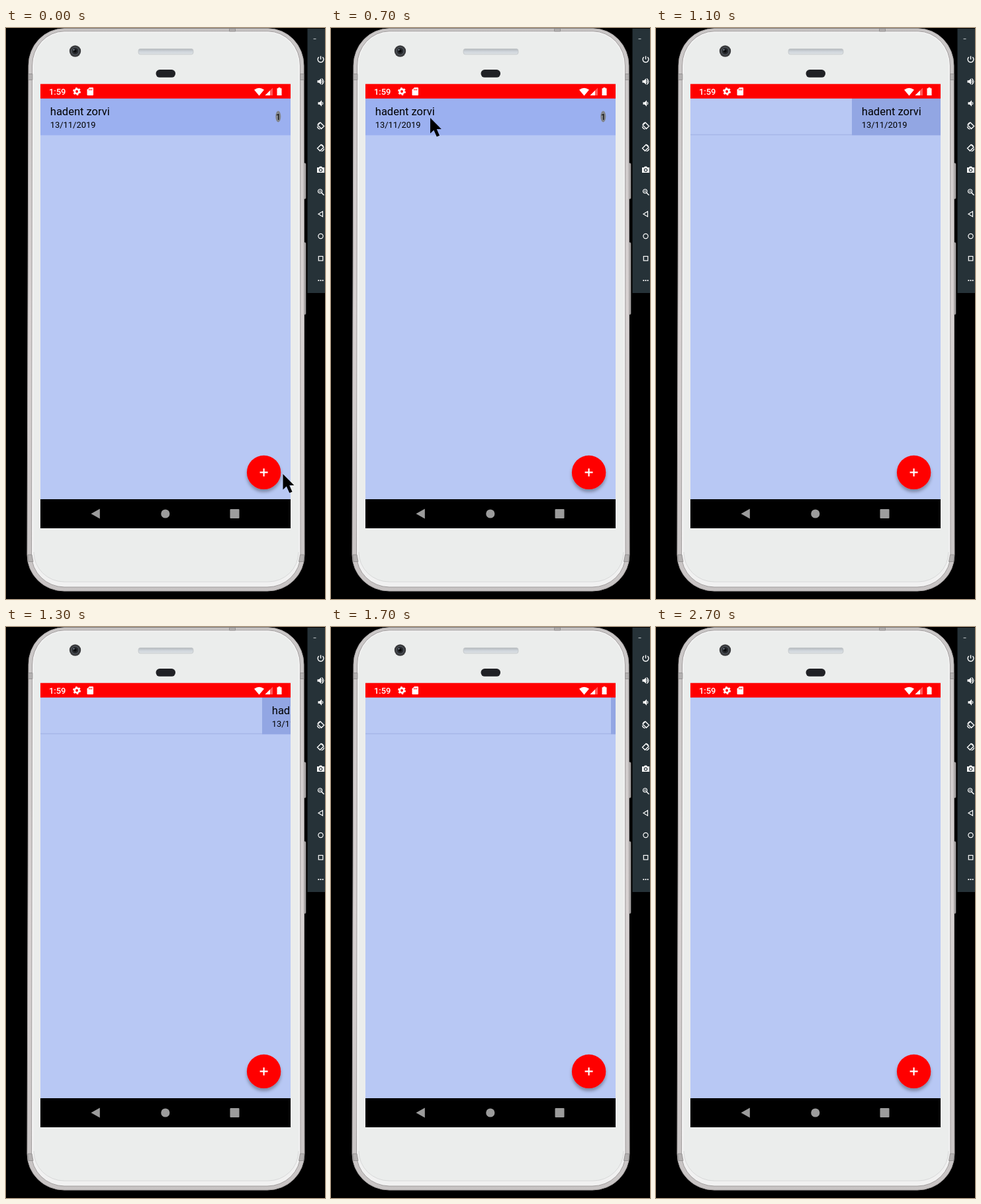
Write an HTML page that moves like this. It is 482 by 864 pixels and loops after 2.9 s.

```html
<!DOCTYPE html>
<html lang="en">
<head>
<meta charset="utf-8">
<style>
html, body { margin: 0; width: 100%; height: 100%; overflow: hidden; background: #000; }
svg { display: block; }
text { font-family: Roboto, sans-serif; }
.tools { fill: none; stroke: #fff; stroke-width: 1.2; }
.tools .solid { fill: #fff; stroke: none; }
</style>
</head>
<body>
<svg width="482" height="864" viewBox="0 0 482 864">
  <defs>
    <linearGradient id="metal" x2="0" y2="1">
      <stop offset="0" stop-color="#cac7c7"/><stop offset=".5" stop-color="#d8d2d2"/><stop offset="1" stop-color="#c8c4c4"/>
    </linearGradient>
    <linearGradient id="grille" x2="0" y2="1">
      <stop offset="0" stop-color="#b3b7bb"/><stop offset=".5" stop-color="#d0d6dc"/><stop offset="1" stop-color="#dde1e4"/>
    </linearGradient>
    <filter id="shade" x="-30%" y="-30%" width="160%" height="170%">
      <feDropShadow dx="0" dy="4" stdDeviation="2.8" flood-opacity=".33"/>
    </filter>
    <clipPath id="screen"><rect x="52" y="106" width="378" height="607"/></clipPath>
  </defs>

  <!-- phone body, slightly wider towards the bottom -->
  <g fill="#b0acac" stroke="#817d7d" stroke-width=".7">
    <rect x="447" y="204.500" width="6" height="54" rx="1.500"/>
    <rect x="447" y="324.500" width="6" height="109" rx="1.500"/>
  </g>
  <path d="M34 57A54 56 0 0 1 88 .8H396A54 56 0 0 1 450 57L451 797A56 55 0 0 1 395 852H88A56 55 0 0 1 32 797Z" fill="url(#metal)" stroke="#a5a1a1"/>
  <path d="M39.500 57A49 52 0 0 1 88 4.800H396A49 52 0 0 1 444.500 57L445 797A50 49 0 0 1 395 846H88A50 49 0 0 1 38.500 797Z" fill="#f1f1f1" stroke="#a19d9d"/>
  <path d="M42 57A46 49 0 0 1 88 7.500H396A46 49 0 0 1 442 57V793A46 45 0 0 1 396 838H88A46 45 0 0 1 42 793Z" fill="#ebedec"/>
  <path d="M42 793A46 45 0 0 0 88 838H396A46 45 0 0 0 442 793" fill="none" stroke="#d8d9d9"/>
  <path d="M34 69.500h6v9h-6zM444.500 69.500h5.500v9h-5.500zM337.500 1h9v4h-9zM33 797h6l2 10.500h-7zM444.500 797h6l-1 10.500h-7z" fill="#b4b1b1" stroke="#8c8989" stroke-width=".8"/>

  <!-- camera, speaker, sensor -->
  <circle cx="104.500" cy="35" r="8.700" fill="#3a3b3d"/>
  <circle cx="104.500" cy="35" r="5.500" fill="#25272a" stroke="#59606a"/>
  <circle cx="104.500" cy="35" r="2.300" fill="#090a0c"/>
  <circle cx="102.500" cy="33" r="1" fill="#8995a3"/>
  <rect x="200" y="31.500" width="83" height="8.500" rx="3" fill="url(#grille)" stroke="#c3c7ca" stroke-width=".8"/>
  <rect x="226.500" y="63" width="29.500" height="11.800" rx="5.700" fill="#202125"/>

  <!-- screen -->
  <rect x="52" y="106" width="378" height="607" fill="#b8c8f4"/>
  <g clip-path="url(#screen)">
    <path id="line" d="M52 161.500H430" stroke="#a6b6e8" stroke-width="1.500"/>
    <g id="row">
      <rect id="card" x="52" y="106" width="378" height="56.300"/>
      <text x="66.800" y="132" font-size="16.500">hadent zorvi</text>
      <text x="66.800" y="150.500" font-size="12.900">13/11/2019</text>
      <ellipse cx="411.300" cy="134" rx="4" ry="8.500" fill="#82858c"/>
      <text x="411.300" y="138.700" font-size="13" text-anchor="middle">1</text>
    </g>
  </g>

  <!-- status bar -->
  <rect x="52" y="84.700" width="378" height="22" fill="#f00"/>
  <g fill="#fff">
    <text x="65" y="101" font-size="12.900" font-weight="500">1:59</text>
    <circle cx="107" cy="96" r="3.300" fill="none" stroke="#fff" stroke-width="2.700"/>
    <circle cx="107" cy="96" r="5.100" fill="none" stroke="#fff" stroke-width="1.800" stroke-dasharray="2.670"/>
    <path d="M126 90h5q1 0 1 1v10q0 1-1 1h-7.500q-1 0-1-1v-7.500z"/>
    <path d="M125.700 92v2.500m2 -2.500v2.500m2 -2.500v2.500" stroke="#f00" stroke-width=".9"/>
    <path d="M375 93.500q7.500-5.500 15 0l-7.500 9z"/>
    <path d="M403 90.500v11.500h-11.500z" fill-opacity=".35"/>
    <path d="M399 94.500v7.500h-7.500z"/>
    <path d="M411.500 90h3v1.300h2v10.700h-7v-10.700h2z"/>
  </g>

  <circle cx="389.600" cy="672.400" r="25.700" fill="#f00" filter="url(#shade)"/>
  <path d="M383.600 672.400h12m-6-6v12" stroke="#fff" stroke-width="2.200"/>

  <!-- navigation bar -->
  <rect x="52" y="713" width="378" height="44"/>
  <g fill="#9c9c9c">
    <path d="M128.500 735l13.300-7.500v15z"/>
    <circle cx="240.800" cy="735" r="6.600"/>
    <rect x="338.500" y="728" width="14" height="14" rx="1"/>
  </g>

  <!-- emulator toolbar -->
  <rect x="455.500" y="1" width="26.500" height="400" fill="#263238"/>
  <g class="tools">
    <path d="M464.500 16.500h4" stroke="#aeb5b8"/>
    <g transform="translate(475.500 47.500)"><path d="M0-5V0M-2.800-3.500a4.400 4.400 0 1 0 5.600 0" stroke-width="1.400"/></g>
    <g transform="translate(475.500 81)"><path class="solid" d="M-5-1.800h2.500L.5-4.800v9.600L-2.500 1.800H-5z"/><path d="M1.500-2q2 2 0 4M1.500-4.500q6 4.500 0 9"/></g>
    <g transform="translate(475.500 114)"><path class="solid" d="M-4-1.800h2.500L1.500-4.800v9.600L-1.500 1.800H-4z"/><path d="M2.300-2q2 2 0 4"/></g>
    <g id="turn" transform="translate(475.500 147.500)"><path d="M-.5-4.500L5 1L1 5L-4.500-.5zM-5 1.500q.5 3.500 4 4M-4.500-1.500L-1.500-4.500" stroke-width="1.400"/></g>
    <g transform="translate(475.500 181) scale(-1 1)"><path d="M-.5-4.500L5 1L1 5L-4.500-.5zM-5 1.500q.5 3.500 4 4M-4.500-1.500L-1.500-4.500" stroke-width="1.400"/></g>
    <g transform="translate(475.500 214.500)"><path class="solid" d="M-5.500-3.500h3l1-1.500h3l1 1.500h3v8h-11z"/><circle r="2.200" cy=".5" stroke="#263238"/></g>
    <g transform="translate(475.500 248)"><circle cx="-1" cy="-1" r="3"/><path d="M1.200 1.200L5 5" stroke-width="1.500"/><path d="M-2.500-1h3M-1-2.500v3" stroke-width=".7"/></g>
    <path d="M472 281.500l6.500-4v8z"/>
    <circle cx="475.500" cy="315" r="3.600"/>
    <rect x="472.300" y="345.500" width="6.500" height="6.500"/>
    <g class="solid"><circle cx="472.300" cy="382" r="1.100"/><circle cx="475.500" cy="382" r="1.100"/><circle cx="478.700" cy="382" r="1.100"/></g>
  </g>

  <path id="cursor" d="M0 0V23.500L5.300 18.500L9.800 28.500L14 26.700L9.700 17H16.800Z"/>
</svg>
<script>
const LOOP = 2900, STEP = 100;
const el = id => document.getElementById(id);
const row = el('row'), card = el('card'), line = el('line'), cursor = el('cursor');

// [time, x, y] of the pointer tip
const path = [[0, 418.500, 675], [199, 418.500, 675], [200, 464, 714], [300, 325, 400],
  [400, 202, 128], [700, 150, 136], [1000, 141.500, 137.500]];
// [time, horizontal offset] of the swiped row
const swipe = [[0, 0], [1000, 0], [1100, 244], [1200, 305], [1300, 335], [1500, 353], [1800, 380]];

function at(keys, t, i) {
  const k = keys.findIndex(p => p[0] > t);
  if (k < 0) return keys[keys.length - 1][i];
  const a = keys[k - 1], b = keys[k];
  return a[i] + (b[i] - a[i]) * (t - a[0]) / (b[0] - a[0]);
}
const show = (node, on) => node.setAttribute('visibility', on ? 'visible' : 'hidden');
const move = (node, x, y) => node.setAttribute('transform', `translate(${x} ${y})`);

function draw(now) {
  const time = now % LOOP;
  // the pointer rests until 200 ms, then everything advances in steps
  const t = time < 200 ? 0 : Math.floor(time / STEP) * STEP;
  const x = at(swipe, t, 1);
  move(cursor, at(path, t, 1), at(path, t, 2));
  show(cursor, t < 1100);
  move(row, x, 0);
  show(row, t < 1800);
  show(line, t >= 1100 && t < 1800);
  card.setAttribute('fill', x ? '#92a6e3' : '#9bb0f0');
  requestAnimationFrame(draw);
}
requestAnimationFrame(draw);
</script>
</body>
</html>
```
